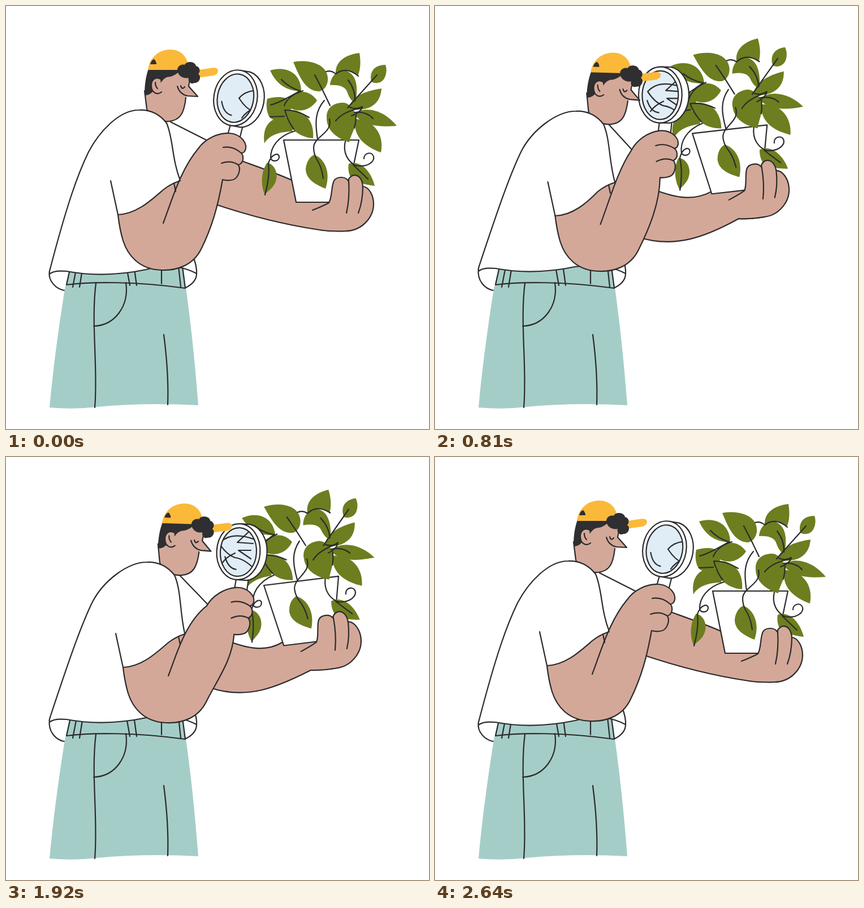
An HTML page with a canvas that plays this animation: 748 by 748 pixels, repeating every 2670 ms.

```html
<!DOCTYPE html>
<html lang="en">
<head>
<meta charset="utf-8">
<title>Plant inspection</title>
<style>
html, body { margin: 0; height: 100%; overflow: hidden; background: #fff; }
canvas { display: block; width: 748px; height: 748px; }
</style>
</head>
<body>
<canvas width="748" height="748"></canvas>
<script>
const ctx = document.querySelector('canvas').getContext('2d');
const INK = '#2b2b2d', SKIN = '#d4a898', LEAF = '#6c7e1f', DENIM = '#a5cdc7',
      YELLOW = '#fbb93a', GLASS = '#e0edf7', HAIR = '#2f2f31', WHITE = '#fff';
const LOOP = 2670, STEP = 30;
const TIMES = [0, 540, 750, 1110, 1500, 1920, 2250, 2640];

// Each bone: pivot and keyed x, y offsets and rotation in degrees.
const bones = {
  k: { at: [252, 113], // head
    x: [0, 20.5, 24, 25, 25, 25, 20.5, 0], y: [0, 5, 4.5, 4, 4, 4, 3.5, 0], r: [0, .7, 1.4, 1.8, 1.8, 1.8, 3.2, 0] },
  p: { at: [491, 237], // plant and the hand below it
    x: [0, -30, -36, -34, -32, -35, -22, 0], y: [0, -9, -12, -6, -7, -10, 11, 0], r: [0, -3.9, -6.5, -6, -5.2, -7, -5.2, 0] },
  g: { at: [406, 162], // magnifier and its hand
    x: [0, -15, -9, -2, 2, 5, 8, 0], y: [0, -10, -6, -3, 4, 5, 10, 0], r: [0, -9.5, -9, -8, -6, -6, 2, 0] },
  e: { x: [0, 14.5, 14.5, 14, 9, 9, -1, 0], y: [0, 2, 2, 2, 3, 3, 3, 0] },             // elbow
  s: { x: [0, 10, 10, 10, 8, 8, -1, 0], y: [0, 3, 3, 3, 4, 4, 6, 0] },                 // sleeve
  t: { x: [0, 14, 14, 14, 14, 14, 11, 0], y: [0, 2, 2, 2, 2, 2, 1, 0] },               // shoulders
  m: { x: [0, 7, 7, 7, 7, 7, 6, 0], y: [0, -2, -2, -2, -2, -2, -2, 0] },               // back
  h: { x: [0, 0, 0, 0, 0, 0, 0, 0], y: [0, -5, -5, -5, -5, -5, -5, 0] },               // hem
  b: { x: [0, -8, -7, -5, -4, -4, -5, 0], y: [0, 58, 59, 60, 60, 59, 42, 0] },         // far elbow
  c: { x: [0, -15, -13, -11, -10, -10, -8, 0], y: [0, 17, 18, 18, 18, 18, 18, 0] },    // far sleeve
  w: { x: [0, -16, -19, -20, -18, -20, -10, 0], y: [0, 22, 19, 21, 22, 19, 25, 0] }    // far wrist
};
let pose = {};

// Monotone cubic through the keys
function sample(keys, t) {
  let i = 0;
  while (i < TIMES.length - 2 && t >= TIMES[i + 1]) i++;
  const rate = j => (keys[j + 1] - keys[j]) / (TIMES[j + 1] - TIMES[j]);
  const slope = j => {
    if (!j || j === TIMES.length - 1) return 0;
    const a = rate(j - 1), b = rate(j);
    return a * b > 0 ? 2 * a * b / (a + b) : 0;
  };
  const d = TIMES[i + 1] - TIMES[i], u = Math.min((t - TIMES[i]) / d, 1), v = 1 - u;
  return keys[i] * (1 + 2 * u) * v * v + keys[i + 1] * u * u * (3 - 2 * u)
       + d * u * v * (v * slope(i) - u * slope(i + 1));
}

function setPose(t) {
  for (const name in bones) {
    const { at = [0, 0], x, y, r } = bones[name];
    const a = r ? sample(r, t) * Math.PI / 180 : 0;
    pose[name] = { at, x: sample(x, t), y: sample(y, t), a, cos: Math.cos(a), sin: Math.sin(a) };
  }
}

// Points prefixed by a bone letter follow that bone.
function route(d, bone) {
  return new Path2D(d.replace(/([a-z]?)(-?[\d.]+),(-?[\d.]+)/g, (all, name, x, y) => {
    const q = pose[name || bone];
    if (!q) return all;
    const dx = x - q.at[0], dy = y - q.at[1];
    return (q.at[0] + q.x + dx * q.cos - dy * q.sin).toFixed(2) + ',' +
           (q.at[1] + q.y + dx * q.sin + dy * q.cos).toFixed(2);
  }));
}
function shape(d, fill, bone, outline = true) {
  const path = route(d, bone);
  if (fill) { ctx.fillStyle = fill; ctx.fill(path); }
  if (outline) ctx.stroke(path);
}
const line = (d, bone) => shape(d, null, bone);
const flat = (d, fill, bone) => shape(d, fill, bone, false);

const leaves = [
  'M467,114 C495,105 522,118 522,151 C495,150 478,138 467,114Z',
  'M508,99 C535,94 567,102 569,127 C570,140 562,150 553,151 C530,150 520,128 508,99Z',
  'M625,83 C600,86 582,98 583,120 C600,110 615,114 622,124 C628,110 627,95 625,83Z',
  'M573,140 C575,118 595,108 608,118 C620,126 623,145 618,172 C610,168 606,160 603,151 C599,141 585,139 573,140Z',
  'M671,104 C650,104 642,118 646,134 C655,139 665,135 669,128 C674,118 673,110 671,104Z',
  'M664,146 C635,150 610,160 606,182 C640,188 662,175 664,146Z',
  'M691,212 C672,188 640,174 615,190 C632,214 665,214 691,212Z',
  'M618,200 C645,200 670,222 663,259 C638,250 612,232 618,200Z',
  'M567,198 C566,180 580,170 598,171 C608,173 615,182 618,192 C621,215 610,225 607,241 C588,235 567,222 567,198Z',
  'M550,167 C535,145 507,146 494,175 C512,190 536,188 550,167Z',
  'M493,184 C522,180 546,198 543,234 C513,231 498,213 493,184Z',
  'M462,164 C490,156 512,164 503,185 C497,205 472,206 465,195 C460,185 460,172 462,164Z',
  'M457,243 C453,215 465,198 490,196 C506,198 510,212 506,222 C485,222 465,228 457,243Z'
];
const hanging = [
  'M462,277 C476,280 485,300 473,318 C465,328 459,330 458,334 C449,315 452,290 462,277Z',
  'M545,263 C560,268 576,290 565,323 C545,315 530,305 530,288 C531,275 538,266 545,263Z',
  'M606,279 C625,272 645,290 652,318 C635,316 615,312 608,300 C605,292 605,285 606,279Z'
];
const veins = [
  'M487,130 Q499,143 519,150', 'M546,122 Q560,148 573,176', 'M566,116 Q575,113 583,120 Q602,106 623,124',
  'M605,131 Q618,148 617,168', 'M656,122 L604,180', 'M608,179 Q620,184 630,178 Q628,188 611,194',
  'M583,203 Q595,187 629,180', 'M619,193 Q619,205 616,216', 'M616,188 Q638,186 649,199',
  'M468,175 Q482,172 520,150 M492,176 Q499,158 525,150', 'M536,197 Q516,184 493,184 Q498,203 509,218',
  'M467,196 L492,195'
];
const stems = [
  'M511,221 C480,230 468,250 468,268 C468,276 483,276 483,267 C483,259 470,260 464,278 Q467,300 458,334',
  'M563,167 C547,185 546,205 551,236', 'M572,200 C578,225 545,230 544,250 Q544,262 550,272 Q558,284 561,305',
  'M600,239 C595,260 605,275 618,282 C640,286 652,275 650,266 C647,257 633,259 633,270', 'M614,281 L640,306'
];

function drawPants() {
  line('Mh77,470 C74,485 88,501 104,503 M337,473 C337,485 328,493 318,498');
  flat('M113,460 L104,500 Q85,620 77,710 Q120,714 160,709 C220,703 285,703 340,706 Q331,590 318,498 L311,455Z', DENIM);
  line('M113,466 L107,493 C150,487 230,487 317,499 L312,461');
  line('M124,466 L118,497 M135,466 L130,497 M214,466 L219,494 M227,465 L231,494 M275,465 V491 M305,460 L309,497');
  line('M159,490 C150,560 163,640 157,710 M212,489 C218,530 193,565 155,566 M279,581 Q288,650 286,705');
}

function drawFarArm() {
  line('Mt291,205 Lc368,244');
  shape('Mb385,262 C b425,278 b460,288 w508,309 L p560,335 L p600,360 L p600,398 Q p580,399 p555,396 C w500,388 b430,371 b365,349', SKIN);
}

function drawPlant() {
  shape('M491,237 L624,237 L601,347 L513,347Z', WHITE, 'p');
  leaves.forEach(d => flat(d, LEAF, 'p'));
  veins.forEach(d => line(d, 'p'));
  hanging.forEach(d => flat(d, LEAF, 'p'));
  stems.forEach(d => line(d, 'p'));
  shape('M542,361 Q560,354 571,348 C577,338 575,318 580,309 C585,301 600,301 605,309 C609,295 629,294 631,319' +
        ' C642,320 650,335 650,350 C650,375 628,398 600,398 Q575,399 555,396', SKIN, 'p');
  line('M606,309 Q608,340 602,366 M631,318 Q631,345 623,366', 'p');
}

function drawLens() {
  const { g, p } = pose, tilt = g.a + Math.PI / 18;
  shape('M397,210 L389,238 L411,243 L418,215', WHITE, 'g');
  ctx.save();
  ctx.translate(406 + g.x, 162 + g.y);
  ctx.rotate(tilt);
  shape('M0,-49 H18 A38,50 0 0 1 18,50 H0', WHITE);
  shape('M0,-49 A38,49 0 0 1 0,50 A38,49 0 0 1 0,-49Z', WHITE);
  const glass = 'M0,-42 A32,43 0 0 1 0,44 A32,43 0 0 1 0,-42Z';
  flat(glass, GLASS);
  ctx.save();
  ctx.clip(route(glass));
  line('M-23,11 Q-16,31 -2,32');
  ctx.rotate(-tilt);
  ctx.translate(p.x - g.x - 406, p.y - g.y - 162);
  line('M475,156 Q432,140 412,163 Q425,183 440,188 Q458,190 478,212 M417,198 Q424,187 440,180');
  line('M469,138 L444,161 L472,163 M468,175 L446,175 L468,190 M452,122 Q470,135 488,150');
  ctx.restore();
  line(glass);
  ctx.restore();
}

function drawHead() {
  flat('M250,125 L246,150 L249,182 C253,198 272,205 288,204 C308,202 315,190 318,165 L325,120 L290,110Z', SKIN, 'k');
  line('M245,150 L249,182 C253,198 272,205 288,204 C308,202 315,190 318,162', 'k');
  flat('M320,130 L324,141 L339,160 L316,159Z', SKIN, 'k');
  line('M325,130 L323,142 L339,160 L321,159 Q307,156 303,142 M309,141 Q311,149 316,143', 'k');
  flat('M252,111 C247,125 245,140 245,158 Q253,158 259,152 L275,134 Q281,125 290,125 Q300,123 308,114 L306,110Z', HAIR, 'k');
  shape('M273,129 C263,124 256,132 257,142 C258,154 268,158 275,152', SKIN, 'k');
  line('M264,135 Q264,142 268,146', 'k');
  flat('M251,113 C253,92 270,77 290,77 C310,77 322,90 324,113Z M341,113 L367,109 Q375,109 375,115 Q374,121 367,123 L338,127Z', YELLOW, 'k');
  flat('M255,103 Q257,95 262,94 Q266,98 266,103Z', HAIR, 'k');
  flat('M304,118 C300,108 309,102 316,104 C319,97 334,97 336,106 C344,108 344,117 340,120' +
       ' C347,126 341,137 333,136 C327,139 321,134 323,127 C315,129 307,125 304,118Z', HAIR, 'k');
}

function drawShirt() {
  shape('Mt235,184 C t255,183 t272,192 t284,207 C t296,235 t293,270 s308,308 L331,443 Q338,462 337,473' +
        ' Q322,465 305,462 Q280,457 h248,466 C h200,476 h150,477 h107,469 Q h84,467 h77,474' +
        ' Q h76,470 h78,465 C m108,350 m127,297 m146,258 C m165,222 t200,184 t235,184Z', WHITE);
}

function drawNearArm() {
  shape('Me278,384 C e293,345 e308,290 g340,252 C g352,235 g375,224 g395,225 C g415,226 g430,244 g422,257' +
        ' Q g420,260 g416,260 C g420,264 g422,277 g411,281 C g416,290 g410,308 g397,308 Q g390,309 g383,307' +
        ' C g375,352 e365,390 e345,430 C e330,460 e300,468 e275,467 C e235,466 e215,440 e207,415' +
        ' Q e201,395 e198,369 C e230,368 e255,345 s278,325 Q s292,314 s308,309', SKIN);
  line('Me185,309 L e198,369 M s297,313 L s300,328');
  line('M384,250 Q401,247 416,260 M381,278 Q398,272 411,281', 'g');
}

function draw(t) {
  setPose(t);
  ctx.fillStyle = WHITE;
  ctx.fillRect(0, 0, 748, 748);
  ctx.strokeStyle = INK;
  ctx.lineWidth = 2.2;
  ctx.lineCap = ctx.lineJoin = 'round';
  drawPants();
  drawFarArm();
  drawPlant();
  drawLens();
  drawHead();
  drawShirt();
  drawNearArm();
}

const start = performance.now();
function tick() {
  const t = (performance.now() - start) % LOOP;
  draw(Math.floor(t / STEP) * STEP);
  requestAnimationFrame(tick);
}
tick();
</script>
</body>
</html>
```
